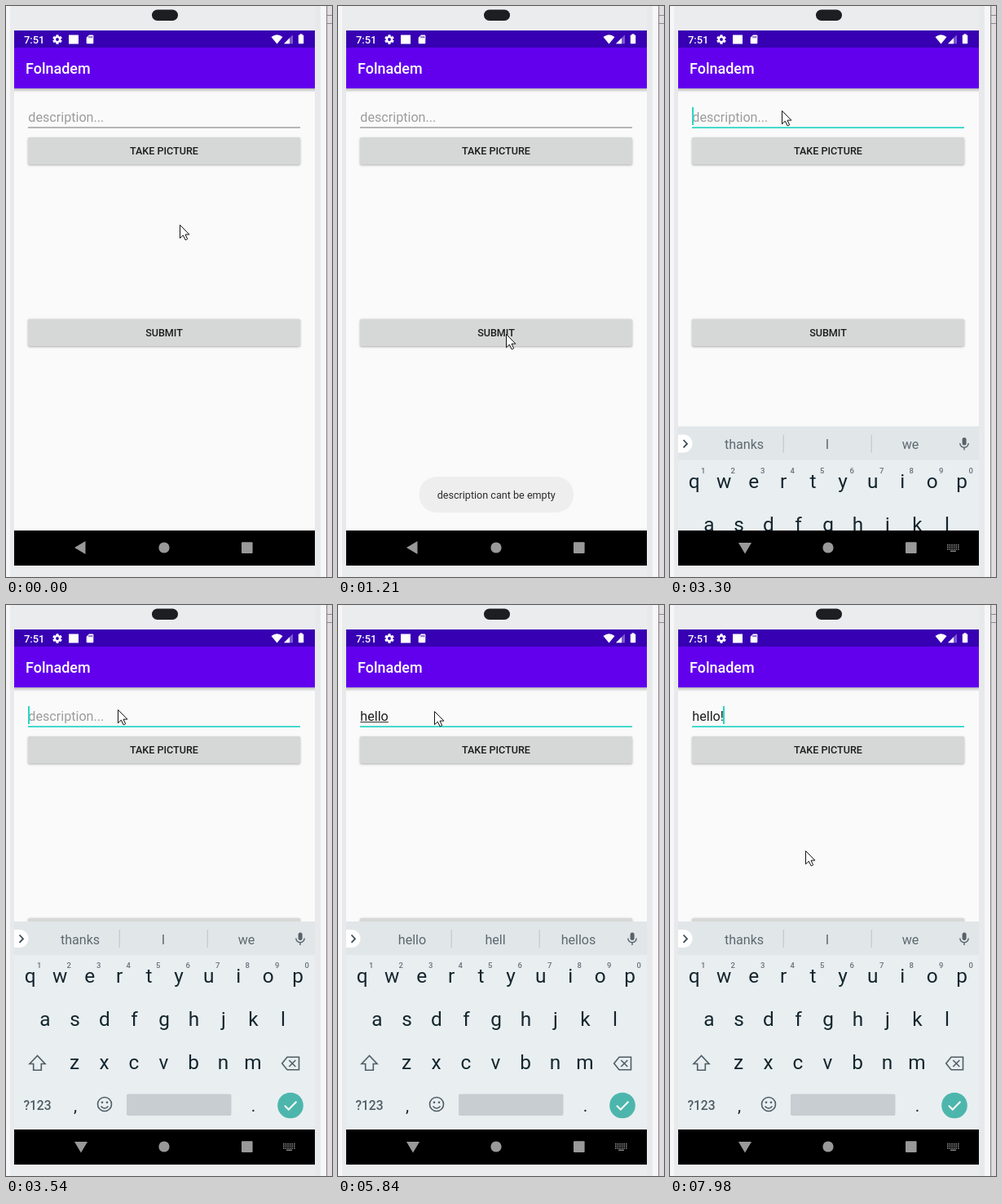
An HTML page with a canvas for the animation above (8 s loop, 400 by 700 pixels).

```html
<!DOCTYPE html>
<html lang="en">
<head>
<meta charset="utf-8">
<title>Post form</title>
<style>
html, body { margin: 0; width: 100%; height: 100%; overflow: hidden; background: #ebecee; }
canvas { display: block; width: 400px; height: 700px; }
</style>
</head>
<body>
<canvas id="stage"></canvas>
<script>
const LOOP = 8000;
const canvas = document.getElementById('stage');
const dpr = window.devicePixelRatio || 1;
canvas.width = 400 * dpr;
canvas.height = 700 * dpr;
const c = canvas.getContext('2d');

// Stepped tracks: each entry holds until the next one starts.
const POINTER = [
  [0, 213, 268], [120, 213, 284], [270, 212, 322], [400, 209, 368], [550, 206, 402],
  [2070, 214, 392], [2220, 238, 366], [2340, 270, 328], [2490, 298, 294],
  [2610, 309, 279], [2760, 268, 236], [2880, 188, 168], [3030, 137, 128],
  [3660, 128, 129], [3810, 118, 130], [6580, 124, 124], [6860, 126, 114],
  [7010, 126, 106], [7160, 131, 140], [7280, 143, 206], [7430, 156, 272],
  [7550, 165, 305], [7980, 166, 301]
];
const PRESS = [[0, 0], [670, 1], [940, 0.45], [1090, 0]];
const TOAST = [[0, 0], [820, 0.17], [940, 0.5], [1090, 0.85], [1210, 1], [2880, 0.5], [3030, 0]];
const KEYS_UP = [[0, 0], [3300, 0.5], [3420, 0.9], [3540, 1]];
const CARET = [
  [0, 0], [3180, 1], [3810, 0], [4240, 1], [4740, 0], [4860, 1],
  [5840, 0], [6270, 1], [6860, 0], [7010, 1], [7550, 0], [7980, 1]
];
const TYPED = [
  [0, '', 'thanks', 'I', 'we'],
  [4240, 'h', 'h', 'he', 'has'],
  [4860, 'he', 'he', 'hey', 'her'],
  [5010, 'hel', 'hel', 'he', 'hey'],
  [5160, 'hell', 'hell', 'hello', 'he'],
  [5310, 'hello', 'hello', 'hell', 'hellos'],
  [7010, 'hello!', 'thanks', 'I', 'we']
];

function at(track, t) {
  let hit = track[0];
  for (const step of track) if (step[0] <= t) hit = step;
  return hit.slice(1);
}

function rect(x, y, w, h, fill, r = 0) {
  c.fillStyle = fill;
  c.beginPath();
  c.roundRect(x, y, w, h, r);
  c.fill();
}

function disc(x, y, r, fill) {
  c.fillStyle = fill;
  c.beginPath();
  c.arc(x, y, r, 0, Math.PI * 2);
  c.fill();
}

function fillPath(d, fill) {
  c.fillStyle = fill;
  c.fill(new Path2D(d));
}

function linePath(d, stroke, width) {
  c.strokeStyle = stroke;
  c.lineWidth = width;
  c.stroke(new Path2D(d));
}

function text(s, x, y, size, fill, align = 'left', weight = 400) {
  c.font = `${weight} ${size}px Roboto, sans-serif`;
  c.textAlign = align;
  c.fillStyle = fill;
  c.fillText(s, x, y);
}

function fade(y, h, alpha) {
  const g = c.createLinearGradient(0, y, 0, y + h);
  g.addColorStop(0, `rgba(0,0,0,${alpha})`);
  g.addColorStop(1, 'rgba(0,0,0,0)');
  return g;
}

function phone() {
  rect(0, 0, 400, 700, '#ebecee');
  rect(0, 0, 5, 700, '#f6f6f8');
  rect(5, 30, 5, 656, '#e7e9eb');
  rect(379, 0, 7, 700, '#e7e9eb');
  rect(386, 0, 7, 700, '#f6f6f8');
  rect(393, 0, 1.5, 700, '#8b878a');
  rect(394.5, 0, 5.5, 700, '#e1dcdf');
  rect(393, 11, 7, 1, '#8b878a');
  rect(393, 21, 7, 1, '#8b878a');
  rect(179, 4.5, 32, 13.5, '#1d1e22', 6.7);
}

function gear(x, y) {
  c.save();
  c.translate(x, y);
  for (let i = 0; i < 6; i++) {
    c.rotate(Math.PI / 3);
    rect(-1.6, -5.8, 3.2, 4, '#fff', 0.5);
  }
  c.restore();
  disc(x, y, 4.3, '#fff');
  disc(x, y, 1.9, '#3700b3');
}

function statusBar() {
  rect(10, 30, 369, 21, '#3700b3');
  text('7:51', 22, 45.5, 12.9, '#fff', 'left', 500);
  gear(63, 41);
  rect(77, 35.5, 12, 11, '#fff');
  fillPath('M102 35.5h4.3q1 0 1 1v8.7q0 1-1 1h-6.6q-1 0-1-1v-6.4z', '#fff');
  for (const x of [101.5, 103.3, 105.1]) rect(x, 37, 0.9, 2.3, '#3700b3');
  fillPath('M325.5 38q7-5.5 14 0l-7 8.5z', '#fff');
  fillPath('M341 46.2l11-11v11z', 'rgba(255,255,255,.35)');
  fillPath('M341 46.2l7-7v7z', '#fff');
  rect(358.8, 35.5, 6.4, 10.8, '#fff', 0.8);
  rect(360.5, 34.3, 3, 2, '#fff');
}

function button(label, y, press) {
  const tone = rgb => Math.round(rgb - 27 * press);
  c.save();
  c.shadowColor = 'rgba(0,0,0,.3)';
  c.shadowBlur = 2.5 * dpr;
  c.shadowOffsetY = dpr;
  rect(27, y, 334, 33.3, `rgb(${tone(214)},${tone(216)},${tone(215)})`, 1.8);
  c.restore();
  text(label, 194, y + 21.3, 12.57, '#1c1c1c', 'center', 500);
}

function field(t, typed) {
  const focused = t >= 3180;
  if (focused) rect(27, 148.3, 334, 1.8, '#2ad6c7');
  else rect(27, 148.4, 334, 1, '#757575');
  if (!typed) text('description...', 27.3, 142, 16.15, '#9c9c9c');
  text(typed, 27.3, 142, 16.15, '#1f1f1f');
  const w = c.measureText(typed).width;
  if (typed && typed !== 'hello!') rect(27.3, 143, w, 1, '#333');
  if (at(CARET, t)[0]) rect(Math.round(26.6 + w), 124, 2, 22, '#2ad6c7');
}

function app(t, typed) {
  rect(10, 51, 369, 592, '#fafafa');
  rect(10, 101, 369, 5, fade(101, 5, 0.26));
  rect(10, 51, 369, 50, '#6200ee');
  text('Folnadem', 24, 83, 17.95, '#fff', 'left', 500);
  field(t, typed);
  button('TAKE PICTURE', 161, 0);
  button('SUBMIT', 383.7, at(PRESS, t)[0]);
}

function toast(alpha) {
  if (!alpha) return;
  c.globalAlpha = alpha;
  rect(99.5, 577, 189.5, 44, '#eeeeee', 21.5);
  text('description cant be empty', 194.2, 604, 12.6, '#2b2b2b', 'center');
  c.globalAlpha = 1;
}

function row(letters, x, y) {
  [...letters].forEach((ch, i) => text(ch, x + 36.5 * i, y, 24.4, '#14262e', 'center'));
}

function suggestions(words) {
  rect(10, 388, 369, 41, '#e1e6e9');
  rect(10, 398, 17.5, 22, '#fff', [0, 11, 11, 0]);
  linePath('M16.5 404.5l4.5 4.7-4.5 4.7', '#37474f', 1.7);
  words.forEach((w, i) => text(w, 91 + 102 * i, 415.5, 16.1, '#5e696f', 'center'));
  rect(138.7, 398, 1, 22, '#bcc4c8');
  rect(246.7, 398, 1, 22, '#bcc4c8');
  rect(358.6, 401.5, 5, 9.5, '#56636a', 2.5);
  linePath('M355.8 408.5a5.2 5.2 0 0 0 10.4 0M361 413.7v3.3', '#56636a', 1.4);
}

function keyboard(words) {
  const ink = '#4f5d65';
  rect(10, 388, 369, 255, '#e9eef1');
  suggestions(words);
  row('qwertyuiop', 29.6, 463);
  for (let i = 0; i < 10; i++) {
    text((i + 1) % 10, 40.8 + 36.5 * i, 445.3, 9.5, '#66727a', 'center', 500);
  }
  row('asdfghjkl', 48, 516);
  row('zxcvbnm', 84, 569);
  linePath('M38.5 552.5l-9.5 10h4.7v7.7h9.6v-7.7h4.7z', ink, 1.6);
  linePath('M345 554.3h14.5v15.5H345l-6.3-7.7zM347.3 558l8 8m0-8l-8 8', ink, 1.6);
  text('?123', 38.5, 618.5, 15.6, ink, 'center', 500);
  text(',', 85, 620.5, 21, '#14262e', 'center');
  text('.', 303.5, 620.5, 21, '#14262e', 'center');
  linePath('M129.5 612a8.5 8.5 0 1 1-17 0a8.5 8.5 0 1 1 17 0M116.5 614.5q4.5 5 9 0', ink, 1.6);
  disc(118, 609.7, 1.3, ink);
  disc(124, 609.7, 1.3, ink);
  rect(148, 599.5, 128.5, 26.5, '#c8cdd1', 2);
  disc(349, 613.5, 15.8, '#4db6ac');
  linePath('M342 613.7l4.8 4.8 9.6-9.8', '#fff', 2);
}

function navBar(typing) {
  const grey = '#999';
  rect(10, 643, 369, 43, '#000');
  fillPath(typing ? 'M84 658h16l-8 13.5z' : 'M97.5 656v16l-13.5-8z', grey);
  disc(194, 664, 6.6, grey);
  rect(289, 657.3, 13.6, 13.6, grey, 1);
  if (!typing) return;
  for (let y = 0; y < 3; y++) {
    for (let x = 0; x < 6; x++) rect(340 + x * 2.6, 660 + y * 2.6, 1.6, 1.6, '#888');
  }
  rect(344, 667.6, 7, 1.4, '#888');
}

function pointer(x, y) {
  c.save();
  c.translate(x + 0.5, y + 0.5);
  const arrow = 'M0 0V16.2L3.8 12.6 6.7 18.4 9.2 17.2 6.5 11.6H11.4Z';
  fillPath(arrow, '#fff');
  linePath(arrow, '#111', 1);
  c.restore();
}

function draw(t) {
  const [typed, ...words] = at(TYPED, t);
  const up = at(KEYS_UP, t)[0];
  c.setTransform(dpr, 0, 0, dpr, 0, 0);
  phone();
  app(t, typed);
  statusBar();
  toast(at(TOAST, t)[0]);
  if (up) {
    c.save();
    c.beginPath();
    c.rect(10, 388, 369, 255);
    c.clip();
    c.translate(0, 255 * (1 - up));
    keyboard(words);
    c.restore();
  }
  navBar(up > 0);
  pointer(...at(POINTER, t));
}

const start = performance.now();
function tick() {
  draw((performance.now() - start) % LOOP);
  requestAnimationFrame(tick);
}
tick();
</script>
</body>
</html>
```
